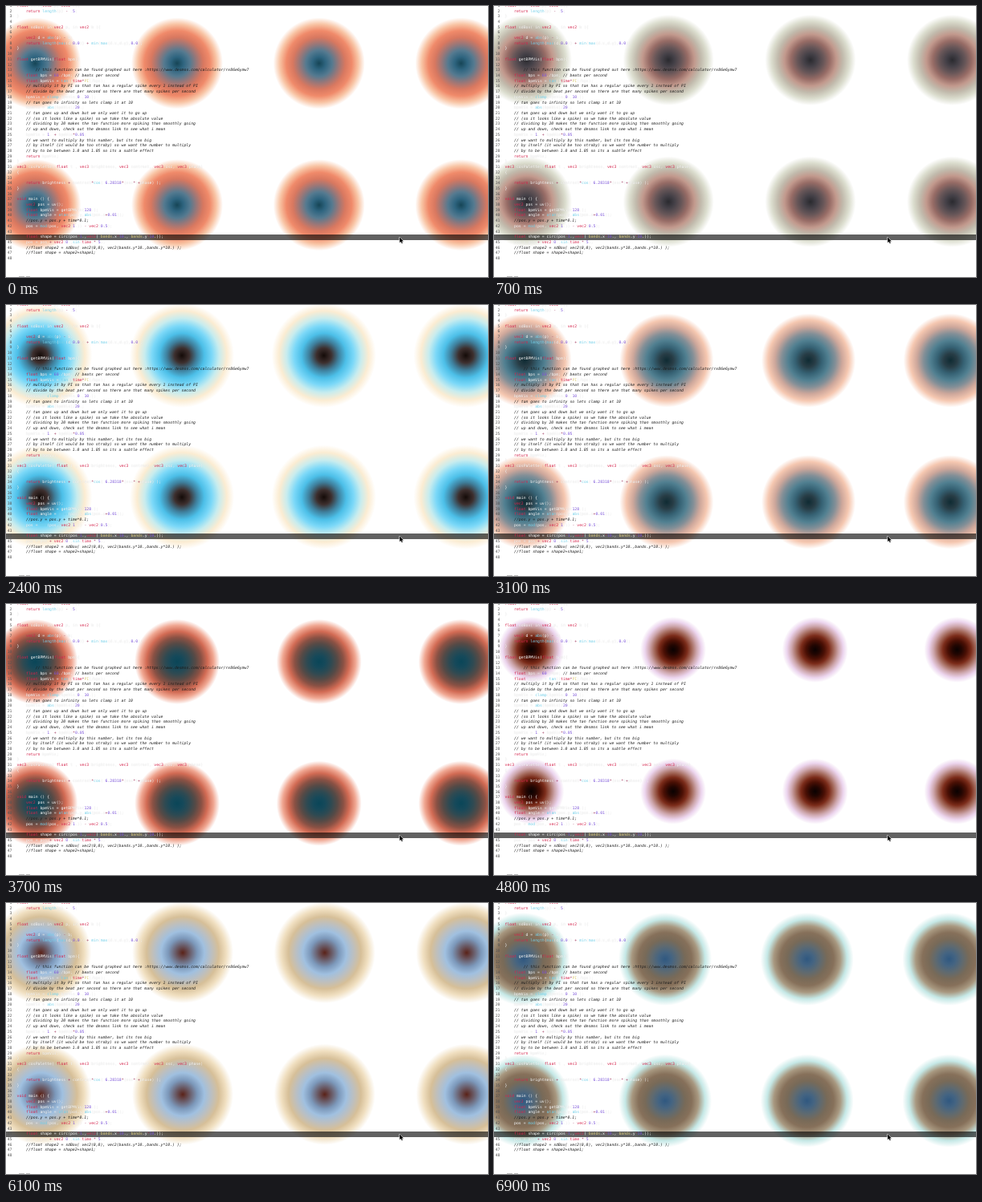
Animation of 600x338 px, one loop 7 s. Source, as an HTML page with a canvas:

```html
<!DOCTYPE html>
<html>
<head>
<meta charset="utf-8">
<title>Live-coded circles</title>
<style>
html, body { margin: 0; width: 600px; height: 338px; overflow: hidden; background: #fff; }
canvas { display: block; }
</style>
</head>
<body>
<canvas id="stage" width="600" height="338"></canvas>
<script>
const W = 600, H = 338, LOOP = 7000, STEP = 100;
const GRID = 176.7;
const FONT_SIZE = 4.81, CHAR = FONT_SIZE * 0.602, LINE = 6.71;
const ctx = document.getElementById('stage').getContext('2d');

const code = `float circ(vec2 p, vec2 r){
    return length(p) - .5;
}

float sdBox( in vec2 p, in vec2 b ){

    vec2 d = abs(p) - b;
    return length(max(d,0.0)) + min(max(d.x,d.y),0.0);
}

float getBPMVis(float bpm){

        // this function can be found graphed out here :https://www.desmos.com/calculator/rx86e6ymw7
    float bps = 60./bpm; // beats per second
    float bpmVis = tan((time*PI)/bps);
    // multiply it by PI so that tan has a regular spike every 1 instead of PI
    // divide by the beat per second so there are that many spikes per second
    bpmVis = clamp(bpmVis,0.,10.);
    // tan goes to infinity so lets clamp it at 10
    bpmVis = abs(bpmVis)/20.;
    // tan goes up and down but we only want it to go up
    // (so it looks like a spike) so we take the absolute value
    // dividing by 20 makes the tan function more spiking than smoothly going
    // up and down, check out the desmos link to see what i mean
    bpmVis = 1. + bpmVis*0.05;
    // we want to multiply by this number, but its too big
    // by itself (it would be too stroby) so we want the number to multiply
    // by to be between 1.0 and 1.05 so its a subtle effect
    return bpmVis;
}
vec3 cosPalette( float t , vec3 brightness, vec3 contrast, vec3 osc, vec3 phase)
{

    return brightness + contrast*cos( 6.28318*(osc*t+phase) );
}

void main () {
    vec2 pos = uv();
    float bpmVis = getBPMVis(128.);
    float angle = atan(pos.y,abs(pos.x+0.01));
    //pos.y = pos.y + time*0.1;
    pos = mod(pos, vec2(1.)) - vec2(0.5);

    float shape = circ(pos*1.,vec2( bands.x*10., bands.y*10.));
    pos = pos + vec2(0.,sin(time)*.5);
    //float shape2 = sdBox( vec2(0,0), vec2(bands.y*10.,bands.y*10.) );
    //float shape = shape2+shape1;
`.split('\n');

// Each pose: time, centre, radius and colours from the middle outwards; the rim is white.
const poses = [
  [0, 213, 71.5, 57, '164556 2f6580 557a90 9a7778 d87860 f08a6a f8c4a4'],
  [1500, 221, 63, 56, '400c03 5f1808 7b2c18 946052 a9bfc0 8cf0f8 b9f9ff'],
  [2400, 219, 63, 65, '140b08 3d2f2e 3f7f9c 4cbfe8 7bd8f8 c8ecee fbecd2'],
  [3700, 213, 72, 53, '0a4658 16495a 2f4a52 564a46 8a5144 d26b54 f0a792'],
  [4800, 223, 57, 41, '0a0202 220602 4b1005 7b2c1a a46a5c cda6ac ecd5ee'],
  [6100, 220, 62, 63, '5a2218 6a5c68 7c98ba a0c0e0 bcbfc0 d6bf98 f0dfc0'],
  [6900, 213, 70, 58, '305880 446482 5f6a70 786a58 86705a a89880 c5e8e6']
].map(([time, x, y, radius, colours]) => ({
  time, x, y, radius,
  colours: (colours + ' ffffff').split(' ').map(hex =>
    [0, 2, 4].map(i => parseInt(hex.slice(i, i + 2), 16)))
}));

const mix = (a, b, k) => a + (b - a) * k;

function poseAt(i) {
  const n = poses.length, turn = Math.floor(i / n), pose = poses[i - turn * n];
  return { ...pose, time: pose.time + turn * LOOP };
}

// Smooth curve through the poses, with slopes taken from the neighbours.
function glide(i, key, k) {
  const [a, b, c, d] = [-1, 0, 1, 2].map(o => poseAt(i + o));
  const span = c.time - b.time;
  const m0 = (c[key] - a[key]) / (c.time - a.time) * span;
  const m1 = (d[key] - b[key]) / (d.time - b.time) * span;
  const k2 = k * k, k3 = k2 * k;
  return (2 * k3 - 3 * k2 + 1) * b[key] + (k3 - 2 * k2 + k) * m0 +
         (3 * k2 - 2 * k3) * c[key] + (k3 - k2) * m1;
}

function drawBalls(t) {
  let i = poses.length - 1;
  while (poses[i].time > t) i--;
  const from = poseAt(i), to = poseAt(i + 1);
  const k = (t - from.time) / (to.time - from.time);
  const x = glide(i, 'x', k), y = glide(i, 'y', k);
  const r = mix(from.radius, to.radius, k);
  const gradient = ctx.createRadialGradient(0, 0, 0, 0, 0, r);
  from.colours.forEach((colour, s) => {
    const rgb = colour.map((v, c) => Math.round(mix(v, to.colours[s][c], k)));
    gradient.addColorStop(s / (from.colours.length - 1), `rgb(${rgb})`);
  });
  ctx.fillStyle = gradient;
  for (let row = 0; row < 2; row++) {
    for (let col = -1; col < 3; col++) {
      ctx.save();
      ctx.translate(x + col * GRID, y + row * GRID);
      ctx.beginPath();
      ctx.arc(0, 0, r, 0, Math.PI * 2);
      ctx.fill();
      ctx.restore();
    }
  }
}

function tokenColour(token) {
  if (token.startsWith('//')) return '#1c1c1c';
  if (/^(float|vec[23]|return|void|time)$/.test(token)) return '#d4244c';
  if (/^\d/.test(token)) return '#7a52d8';
  if (/^(length|abs|max|min|tan|clamp|cos|sin|atan|mod)$/.test(token)) return '#74cfe8';
  if (/^(PI|bands)$/.test(token)) return '#dccb78';
  if (/^[-+*]$/.test(token)) return '#a03a60';
  return '#fff';
}

function makeText() {
  const layer = document.createElement('canvas');
  layer.width = W;
  layer.height = H;
  const g = layer.getContext('2d');
  const face = `${FONT_SIZE}px "DejaVu Sans Mono", monospace`;
  code.forEach((line, i) => {
    const y = 0.8 + i * LINE;
    g.font = face;
    g.shadowColor = 'transparent';
    g.fillStyle = '#555';
    g.textAlign = 'right';
    g.fillText(i + 1, 7.5, y);
    g.textAlign = 'left';
    for (const match of line.matchAll(/\/\/.*|\d+(\.\d+)?|\w+|\S/g)) {
      const token = match[0], colour = tokenColour(token);
      g.font = (token.startsWith('//') ? 'italic ' : '') + face;
      g.fillStyle = colour;
      g.shadowColor = colour === '#fff' ? 'rgba(0,0,0,.2)' : 'transparent';
      g.shadowBlur = 1;
      g.fillText(token, 13.5 + match.index * CHAR, y);
    }
  });
  return layer;
}

const text = makeText();
const pointer = new Path2D('M490 288.5V295.2L491.6 293.8L492.7 296.2L493.8 295.7L492.7 293.4H494.8Z');

function draw(now) {
  const t = Math.floor(now % LOOP / STEP) * STEP;
  ctx.fillStyle = '#fff';
  ctx.fillRect(0, 0, W, H);
  drawBalls(t);
  ctx.fillStyle = 'rgba(0,0,0,.62)';
  ctx.fillRect(0, 285, W, 7);
  ctx.drawImage(text, 0, 0);
  ctx.fillStyle = '#bbb';
  ctx.fillRect(16, 337, 7, 1);
  ctx.fillRect(25, 337, 5, 1);
  ctx.strokeStyle = '#fff';
  ctx.lineWidth = 1;
  ctx.stroke(pointer);
  ctx.fillStyle = '#000';
  ctx.fill(pointer);
}

const start = performance.now();
function tick() {
  draw(performance.now() - start);
  requestAnimationFrame(tick);
}
tick();
</script>
</body>
</html>
```
